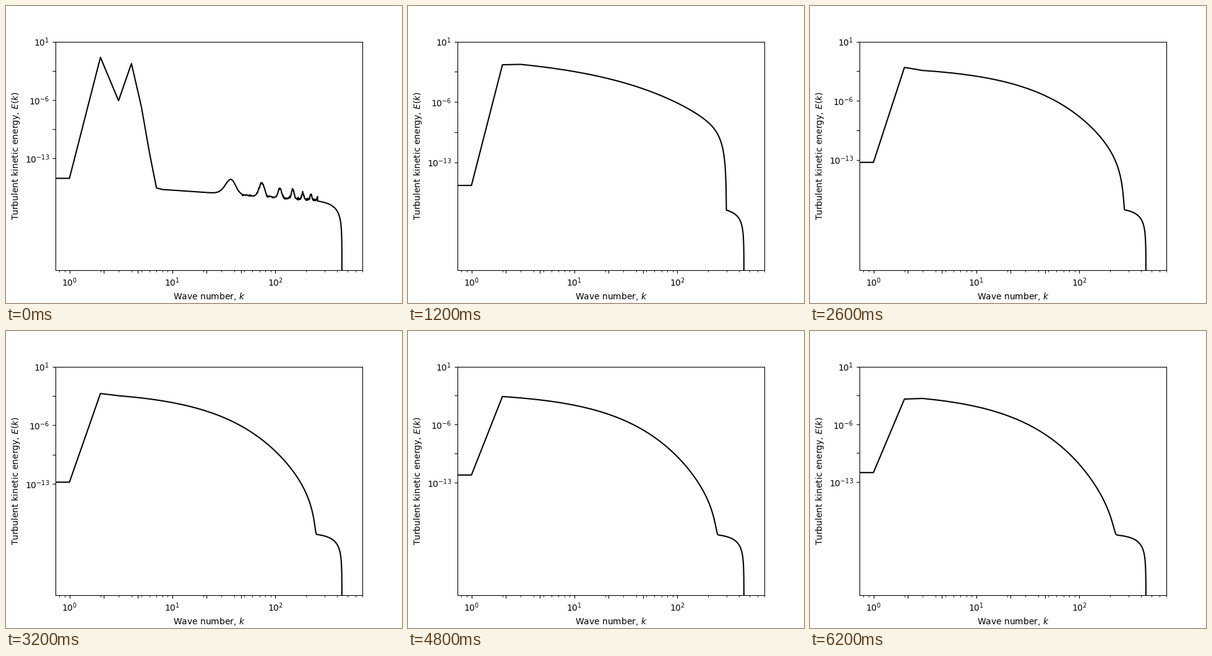
Write a matplotlib script that moves like this. It is 640 by 480 pixels and loops after 6.4 s.

```python
import numpy as np
import matplotlib.pyplot as plt
from matplotlib.animation import FuncAnimation

FRAMES, INTERVAL = 32, 200
TOP, HEIGHT = 57.6, 369.6      # axes in stage pixels
ONSET = 1.2                    # seconds until the cascade is fully developed
K_MAX = 256 * np.sqrt(3)       # corner of the spectral cube

K = np.concatenate([np.arange(1, 11), np.arange(11, 443, 0.5), [443, K_MAX]])
LOG_K = np.log10(K)


def noise_floor(level):
    """Round-off plateau that falls away at the corner of the cube."""
    return level - 15 * np.log(np.maximum(1 - (K / K_MAX) ** 3, 1e-12))


def initial_height():
    """Two energetic modes above a noise floor with harmonic peaks."""
    y = 296.5 + 11.5 * (LOG_K - 0.9)
    for n, peak in enumerate([24, 22, 15.5, 15.5, 10, 9.5, 6], 1):
        y -= peak * np.exp(-(((K - 36.9 * n) / 4.2) ** 2) / 2)
    grain = np.random.default_rng(4).normal(0, 0.8, 450)
    y += np.where(K > 44, grain[K.astype(int)], 0)
    y = np.where(K > 257, noise_floor(312), y)
    y[:7] = 278.5, 83, 153, 93, 163, 238, 294
    return y


def developed_height(t):
    """Stretched-exponential decay, a sharp cutoff, then the noise floor."""
    age = t - ONSET
    key_times = [1.2, 2, 3.2, 4.2, 5.4, 6.2]
    drop = np.interp(t, key_times, [72, 81.5, 122.5, 126.5, 133, 145.5])
    cutoff = np.interp(t, key_times, [300, 299, 256, 268, 245, 243])
    power = 0.7 - 0.25 * np.exp(-age / 0.25)

    start = 106 + 20 * (1 - np.exp(-age / 3))
    y = start + drop * (K ** power - 10 ** power) / (170 ** power - 10 ** power)
    y -= 30 * np.log(np.maximum(1 - (K / cutoff) ** 6, 1e-9))
    soft = 5.9                 # pixels per e-fold, so energies add up
    y = -soft * np.logaddexp(-y / soft, -noise_floor(324.5 + 0.6 * age) / soft)
    y[0] = 226 + 64 * np.exp(-age / 1.6)
    y[1] = 95 + 3 * age
    return y


def spectrum(frame):
    """Log energy at every wave number and the lower axis limit."""
    t = frame * INTERVAL / 1000
    age = max(t - ONSET, 0)
    ease = 1 - (1 - min(t / ONSET, 1)) ** 2
    height = INITIAL + (developed_height(ONSET + age) - INITIAL) * ease
    tick = 246 + (242 + 10.5 * np.exp(-age / 3) - 246) * ease
    decade = (tick - TOP) / 14
    return 1 - (height - TOP) / decade, 1 - HEIGHT / decade


INITIAL = initial_height()

plt.rcParams["font.family"] = "DejaVu Sans"
fig, ax = plt.subplots(figsize=(6.4, 4.8), dpi=100)
ax.set_xscale("log")
ax.set_yscale("log")
ax.set_xticks(np.logspace(0, 2, 7))
ax.set_yticks(np.logspace(-13, 1, 5))
ax.set_xlim(513 ** -0.05, 513 ** 1.05)
ax.set_xlabel("Wave number, $k$")
ax.set_ylabel("Turbulent kinetic energy, $E(k)$")
line, = ax.plot([], [], color="black", lw=1.5)


def update(frame):
    energy, bottom = spectrum(frame)
    ax.set_ylim(10.0 ** bottom, 10)
    line.set_data(np.r_[0.1, K], 10.0 ** np.r_[energy[0], energy])
    return line,


anim = FuncAnimation(fig, update, frames=FRAMES, init_func=lambda: update(0),
                     interval=INTERVAL, repeat=True, repeat_delay=0, blit=False)
plt.show()
```
